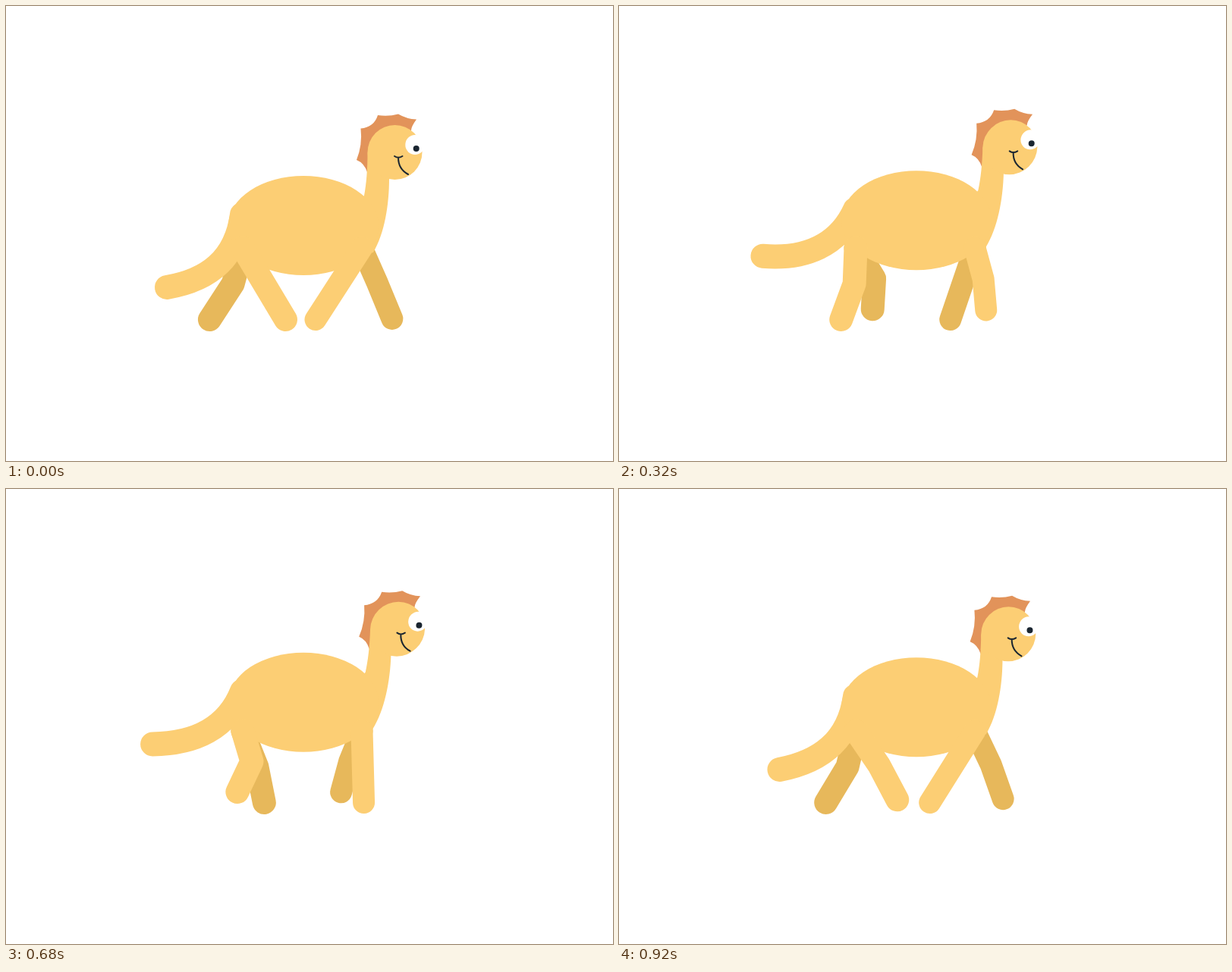
An HTML page with a canvas that plays this animation: 800 by 600 pixels, repeating every 960 ms.

```html
<!DOCTYPE html>
<html lang="en">
<head>
<meta charset="utf-8">
<title>Walking dinosaur</title>
<style>
  html, body { margin: 0; width: 100%; height: 100%; overflow: hidden; background: #fff; }
  canvas { display: block; }
</style>
</head>
<body>
<canvas id="stage" width="800" height="600"></canvas>
<script>
const ctx = document.getElementById('stage').getContext('2d');
const LOOP = 960, STEP = 40;
const SKIN = '#fcce74', SHADE = '#e7b85b', CREST = '#e2935a', INK = '#1a2530';

const neck = new Path2D('M476.5 193C476.5 215 475 235 472 250L440 290L460 330L484 325C499 300 505 262 505 227Z');
const crest = new Path2D('M476 219Q472 207 462 203Q470 183 467.5 161.500Q485 160 490 144Q504 146 517 142.500Q528 149 541 149.500Q534 159 534 164L512 190Z');
const mouth = new Path2D('M512 198Q517 201.500 522.500 198M517 200Q517 215 530 222');

const hind = { hipX: 312, footX: 318, width: 31, bend: (angle, lift) => 9 * Math.abs(Math.sin(angle / 2)) + 0.6 * lift };
const front = { hipX: 469, footX: 458.5, width: 29, bend: (angle, lift) => 0.6 * lift * Math.cos(angle) };

const mix = (a, b, k) => a + (b - a) * k;

function ellipse(x, y, rx, ry, color) {
  ctx.fillStyle = color;
  ctx.beginPath();
  ctx.ellipse(x, y, rx, ry, 0, 0, 2 * Math.PI);
  ctx.fill();
}

function stroke(color, width, path) {
  ctx.strokeStyle = color;
  ctx.lineWidth = width;
  path ? ctx.stroke(path) : ctx.stroke();
}

// The foot slides back along the ground, then swings forward through the air
function drawLeg({ hipX, footX, width, bend }, color, time) {
  const angle = 2 * Math.PI * time / LOOP, hipY = 319;
  const lift = 14.5 * Math.max(0, -Math.sin(angle));
  const x = footX + 50.5 * Math.cos(angle), y = 413.5 - lift;
  ctx.beginPath();
  ctx.moveTo(hipX, hipY);
  ctx.lineTo((hipX + x) / 2 + bend(angle, lift), (hipY + y) / 2);
  ctx.lineTo(x, y);
  stroke(color, width);
}

function drawTail(t, rise) {
  const k = (1 - Math.cos(2 * Math.PI * t / LOOP)) / 2;
  ctx.beginPath();
  ctx.moveTo(311, 275 - rise);
  ctx.bezierCurveTo(mix(303, 285, k), mix(335, 318, k) - rise,
    mix(265, 239, k), mix(362, 334, k) - rise, mix(212, 182, k), mix(371, 316, k));
  stroke(SKIN, 32);
}

function drawHead(t, rise) {
  const lean = 0.004 * rise;
  ctx.save();
  ctx.transform(1, 0, -lean, 1, 300 * lean, -rise);
  ctx.fillStyle = CREST;
  ctx.fill(crest);
  ctx.fillStyle = SKIN;
  ctx.fill(neck);
  ellipse(512.5, 193, 36, 36, SKIN);
  stroke(INK, 2, mouth);

  // Blink around the middle of the loop
  const open = Math.min(1, 0.1 + 0.9 * Math.abs(t - LOOP / 2) / 96);
  ctx.translate(0, 190);
  ctx.scale(1, open);
  ellipse(539, -7, 12.7, 13, '#fff');
  ellipse(540.7, -2, 4, 4, INK);
  ctx.restore();
}

function draw(t) {
  // Two linear bounces per loop
  const half = LOOP / 2, rise = 10 * (1 - Math.abs(1 - 2 * (t % half) / half));
  ctx.clearRect(0, 0, 800, 600);
  ctx.lineCap = ctx.lineJoin = 'round';
  drawLeg(hind, SHADE, t - half - 30);
  drawLeg(front, SHADE, t - 12);
  drawTail(t, rise);
  drawHead(t, rise);
  ellipse(392, 289.5 - rise, 99, 65.5, SKIN);
  drawLeg(hind, SKIN, t);
  drawLeg(front, SKIN, t - half);
}

function tick() {
  draw(Math.floor(performance.now() / STEP) * STEP % LOOP);
  requestAnimationFrame(tick);
}
tick();
</script>
</body>
</html>
```
